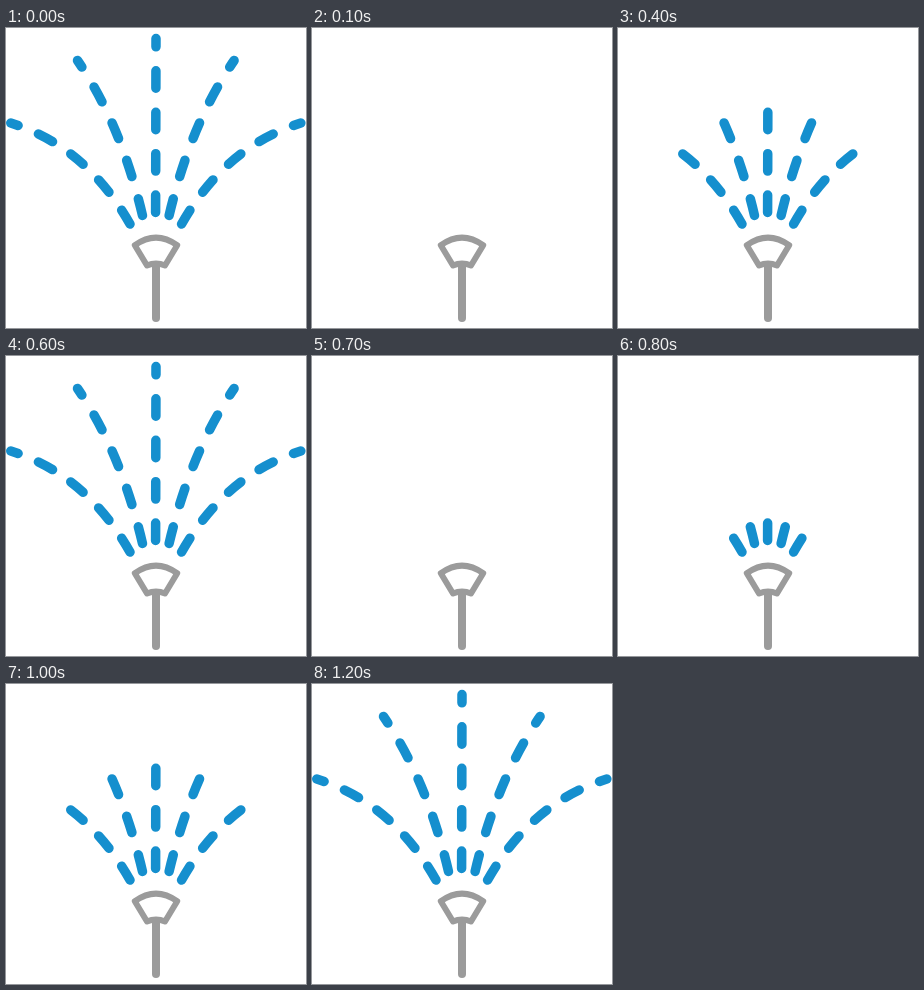
An HTML page for the animation above (1300 ms loop, 300 by 300 pixels).

```html
<!DOCTYPE html>
<html lang="en">
<head>
<meta charset="utf-8">
<title>Sprinkler</title>
<style>
  html, body { margin: 0; width: 100%; height: 100%; overflow: hidden; background: #fff; }
  svg { display: block; width: 100vw; height: 100vh; }
  path { fill: none; stroke-linecap: round; stroke-linejoin: round; }
  #spray { stroke: #158fce; stroke-width: 9.5; }
  #nozzle { stroke: #9b9b9b; }
</style>
</head>
<body>
<svg viewBox="0 0 300 300">
  <defs>
    <!-- One dash period is 100 units, so each jet holds four dashes and a short tip. -->
    <g id="side">
      <path pathLength="420" d="M124 196Q80.3 118.7 4.8 95"/>
      <path pathLength="420" d="M136.5 187.5Q114.7 95.3 71.5 32.5"/>
    </g>
  </defs>
  <g id="spray">
    <use href="#side"/>
    <use href="#side" transform="translate(299.6) scale(-1 1)"/>
    <path pathLength="420" d="M149.6 184.5L150 10.5"/>
  </g>
  <g id="nozzle">
    <path d="M128.8 217.3Q150 202 171.2 217.3L159 237.5Q150 233.5 141 237.5Z" stroke-width="6"/>
    <path d="M150 238V290" stroke-width="8"/>
  </g>
</svg>
<script>
  const spray = document.getElementById('spray');
  const start = performance.now();

  function draw() {
    const step = Math.floor((performance.now() - start) % 1300 / 100);
    const dashes = (step + 5) % 6;
    spray.style.display = dashes ? '' : 'none';
    // Full dashes first, then a gap long enough to hide the rest of the jet.
    spray.setAttribute('stroke-dasharray', '42 58 '.repeat(Math.max(dashes - 1, 0)) + '42 900');
    requestAnimationFrame(draw);
  }
  draw();
</script>
</body>
</html>
```
